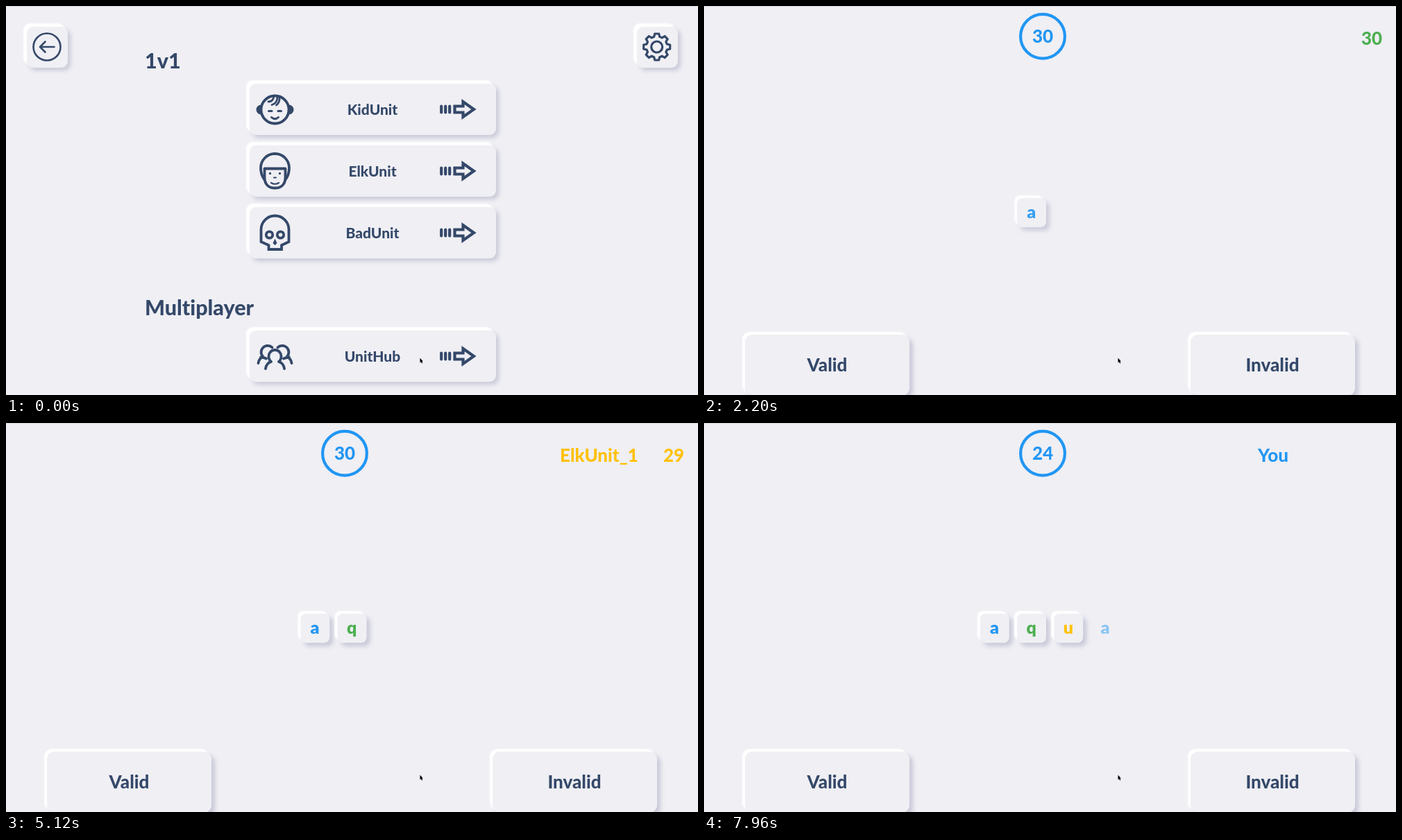
Animation, 997 px wide and 561 px high, one loop 8000 ms. Source, as an HTML page:

```html
<!DOCTYPE html>
<html lang="en">
<head>
<meta charset="utf-8">
<title>Word game</title>
<style>
  html, body { margin: 0; width: 100%; height: 100%; overflow: hidden; background: #efeff4; }
  #stage {
    position: absolute; left: 0; top: 0; width: 997px; height: 561px; overflow: hidden;
    box-sizing: border-box; border-top: 1px solid #d9d9e0;
    font: 800 26px/0 Lato, sans-serif; font-variant-ligatures: none; color: #344869;
    --blue: #2196f3; --green: #4caf50; --amber: #ffc107; --shade: #c9c9d8;
  }
  /* children are placed against the stage edge, above its border */
  .view, #cursor { position: absolute; left: 0; top: -1px; width: 997px; height: 561px; }
  .view svg { position: absolute; left: 0; top: 0; }
  .box, .text { position: absolute; left: var(--x); top: var(--y); white-space: nowrap; }
  .box {
    border-radius: 9px; background: #efeff4;
    box-shadow: -5px -5px 2px #fff, 4px 4px 6px var(--shade);
  }
  .row { left: 351px; width: 355px; height: 74px; }
  .icon { top: 30px; width: 59px; height: 59px; }
  .mid { transform: translateX(-50%); }
  .head { font-size: 30.5px; }
  .name { left: 528px; font-size: 21px; }
  .answer { top: 474px; width: 237px; height: 88px; border-radius: 11px;
    box-shadow: -4px -4px 2px #fff, 5px 5px 6px var(--shade); }
  .tile {
    left: 450.7px; top: 275px; width: 42px; height: 42px; border-radius: 8px;
    box-shadow: -4px -4px 2px #fff, 5px 5px 6px var(--shade);
    text-align: center; line-height: 39px; font-size: 25px; font-weight: 900; color: var(--c);
  }
  .bare { background: none; box-shadow: none; }

  .line { fill: none; stroke: #344869; stroke-width: 3.8; stroke-linecap: round; stroke-linejoin: round; }
  .solid { fill: #344869; stroke: none; }

  #menu, #game, .tile { animation: 8s linear infinite both; }
  #menu { animation-name: leave; }
  #game { animation-name: arrive; }
  #t1 { animation-name: first; }
  #t2 { animation-name: second; }
  #t3 { animation-name: third; }
  #t4 { animation-name: draft; }
  @keyframes leave { 0%, 5.5% { opacity: 1 } 8.5%, 100% { opacity: 0 } }
  @keyframes arrive { 0%, 15.5% { opacity: 0 } 18%, 100% { opacity: 1 } }
  @keyframes first {
    0%, 25.5% { opacity: 0; transform: translate(0, 20px) }
    27.75%, 58.5% { opacity: 1; transform: none }
    60.5%, 71.5% { opacity: 1; transform: translate(-26.6px, 0) }
    73.5%, 100% { opacity: 1; transform: translate(-53.2px, 0) }
  }
  @keyframes second {
    0%, 58.5% { opacity: 0; transform: translate(26.6px, 20px) }
    60.75%, 71.5% { opacity: 1; transform: translate(26.6px, 0) }
    73.5%, 100% { opacity: 1; transform: none }
  }
  @keyframes third {
    0%, 71.5% { opacity: 0; transform: translate(53.2px, 20px) }
    73.75%, 100% { opacity: 1; transform: translate(53.2px, 0) }
  }
  @keyframes draft {
    0%, 79.99% { opacity: 0; transform: translate(106.4px, 0) }
    80%, 100% { opacity: .48; transform: translate(106.4px, 0) }
  }
</style>
</head>
<body>
<div id="stage">
  <div id="menu" class="view">
    <div class="box icon" style="--x:30px"></div>
    <div class="box icon" style="--x:909px"></div>
    <div class="box row" style="--y:112px"></div>
    <div class="box row" style="--y:201px"></div>
    <div class="box row" style="--y:290px"></div>
    <div class="box row" style="--y:468px"></div>

    <div class="text head" style="--x:200px;--y:78px">1v1</div>
    <div class="text head" style="--x:200px;--y:434px">Multiplayer</div>
    <div class="text name mid" style="--y:148.5px">KidUnit</div>
    <div class="text name mid" style="--y:237.5px">ElkUnit</div>
    <div class="text name mid" style="--y:326.5px">BadUnit</div>
    <div class="text name mid" style="--y:504.5px">UnitHub</div>

    <svg class="line" width="997" height="561">
      <defs>
        <g id="go">
          <path stroke-width="4.2" d="M627.2 144.500v9M633.2 144.500v9M639.2 144.500v9"/>
          <path stroke-linejoin="miter" stroke-width="4.2" d="M646.5 144.500H658.500V138L674 149L658.500 160V153.500H646.500Z"/>
        </g>
      </defs>
      <use href="#go"/>
      <use href="#go" y="89"/>
      <use href="#go" y="178"/>
      <use href="#go" y="356"/>

      <!-- back and settings -->
      <g stroke-width="2.6">
        <circle cx="59" cy="59" r="19.500"/>
        <path d="M69.500 59H49M56.500 51.500L49 59l7.500 7.500"/>
      </g>
      <g stroke-width="3.2">
        <path id="gear"/>
        <circle cx="937.700" cy="59" r="8"/>
      </g>

      <!-- baby -->
      <circle cx="387.500" cy="149.500" r="20"/>
      <path class="solid" d="M367.500 142.500a7 7 0 0 0 0 14ZM407.500 142.500a7 7 0 0 1 0 14Z"/>
      <path stroke-width="3" d="M378.500 151.500h4.500M392 151.500h4.500M382.500 160.500q5 4.500 10 0"/>
      <path stroke-width="2.8" d="M378 138q7 0 8-8M383 142.500q8-2 8-12M389.500 143q5-4 4.500-11"/>

      <!-- boxer -->
      <path d="M372 250Q367 243 367 233.500A20.500 20.500 0 0 1 408 233.500Q408 243 403 250"/>
      <path d="M372.500 234.500H402.500V248C402.500 257.500 396 262.500 387.500 262.500S372.500 257.500 372.500 248Z"/>
      <path stroke-width="2.2" d="M386 247.500h3M382 255q5.500 3.500 11 0"/>
      <path stroke-width="3.400" d="M380.500 241.500v0M394.500 241.500v0"/>

      <!-- skull -->
      <path stroke-linejoin="miter" d="M367.500 340V322.500a20 20 0 0 1 40 0V340L397 345V351H378.500V345Z"/>
      <circle cx="379.500" cy="330" r="4.700"/>
      <circle cx="395.500" cy="330" r="4.700"/>
      <path class="solid" d="M387.500 335.500l3 6.500-3 3-3-3Z"/>

      <!-- club -->
      <path d="M374 523q1-8 8-10a9 9.500 0 1 1 11 0q7 2 8 10"/>
      <g id="pal"><path d="M363.500 515q1-7 7-9a9 9 0 1 1 13-13.500M367 506.500q4 0 8 2"/></g>
      <use href="#pal" transform="matrix(-1 0 0 1 775 0)"/>
    </svg>
  </div>

  <div id="game" class="view">
    <svg width="997" height="100">
      <circle cx="488" cy="43.700" r="31.900" fill="none" stroke="#2196f3" stroke-width="4.200"/>
    </svg>
    <div id="clock" class="text mid" style="--x:488px;--y:43px;color:var(--blue)">30</div>
    <div id="player" class="text" style="--x:798px;--y:45.500px"></div>
    <div id="score" class="text" style="--x:947px;--y:45.500px"></div>

    <div id="t1" class="box tile" style="--c:var(--blue)">a</div>
    <div id="t2" class="box tile" style="--c:var(--green)">q</div>
    <div id="t3" class="box tile" style="--c:var(--amber)">u</div>
    <div id="t4" class="box tile bare" style="--c:var(--blue)">a</div>

    <div class="box answer" style="--x:59px"></div>
    <div class="box answer" style="--x:701px"></div>
    <div class="text mid" style="--x:177.500px;--y:517px">Valid</div>
    <div class="text mid" style="--x:819px;--y:517px">Invalid</div>
  </div>

  <svg id="cursor">
    <path transform="translate(596.500 507.500) scale(.88)" d="M0 0V8L1.700 6.500 3 9 4.300 8.400 3.200 5.800H5Z" stroke="#fff" stroke-width=".8" paint-order="stroke"/>
  </svg>
</div>
<script>
  const LOOP = 8000, SECOND = 333;
  const $ = id => document.getElementById(id);

  function gearPath(cx, cy, teeth) {
    const corners = [[-0.34, 15.2], [-0.2, 19.2], [0.2, 19.2], [0.34, 15.2]];
    const points = [];
    for (let i = 0; i < teeth; i++) {
      for (const [turn, r] of corners) {
        const a = (i + turn) * 2 * Math.PI / teeth;
        points.push((cx + r * Math.sin(a)).toFixed(1) + " " + (cy - r * Math.cos(a)).toFixed(1));
      }
    }
    return "M" + points.join("L") + "Z";
  }
  $("gear").setAttribute("d", gearPath(937.7, 59, 8));

  // Seconds left since start, never below the floor.
  const left = (t, start, floor) =>
    Math.max(floor, 30 - Math.max(0, Math.floor((t - start) / SECOND)));

  function turnAt(t) {
    if (t < 2160) return ["", "", "green"];
    if (t < 4700) return [t < 2280 ? "" : "ElkUnit_0", left(t, 2160, 26), "green"];
    if (t < 5720) return ["ElkUnit_1", left(t, 4700, 29), "amber"];
    return ["You", "", "blue"];
  }

  function put(el, value) {
    if (el.textContent !== String(value)) el.textContent = value;
  }

  let begin;
  function draw(now) {
    begin ??= now;
    const t = (now - begin) % LOOP;
    const [name, score, color] = turnAt(t);
    put($("clock"), left(t, 5850, 0));
    put($("player"), name);
    put($("score"), score);
    $("player").style.color = $("score").style.color = `var(--${color})`;
    requestAnimationFrame(draw);
  }
  requestAnimationFrame(draw);
</script>
</body>
</html>
```
